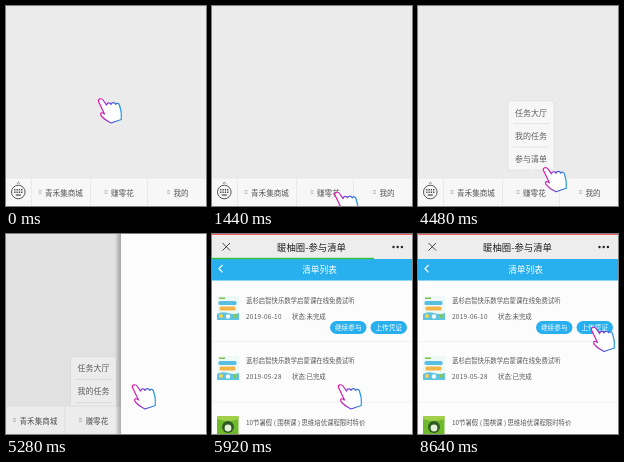
Animation, 200 px wide and 200 px high, one loop 8800 ms. Source, as an HTML page:

```html
<!DOCTYPE html>
<html>
<head>
<meta charset="utf-8">
<title>Menu tour</title>
<style>
html, body { margin: 0; width: 100%; height: 100%; overflow: hidden; background: #ebebeb; }
svg { display: block; width: 100%; height: 100%; }
text { font-family: "Noto Sans CJK SC", "Noto Sans CJK", "Noto Sans", sans-serif; dominant-baseline: central; }
.mid { text-anchor: middle; }
.bar { font-size: 7.6px; fill: #555; }
.menu { font-size: 8px; fill: #606060; }
.row { font-size: 6.4px; fill: #555; }
.day { letter-spacing: .3px; }
.btn { font-size: 6.7px; fill: #fff; }
</style>
</head>
<body>
<svg viewBox="0 0 200 200" preserveAspectRatio="none">
  <defs>
    <linearGradient id="ink" x1="0" y1="0" x2="1" y2="0">
      <stop offset="0" stop-color="#ec12a0"/>
      <stop offset=".35" stop-color="#a030c8"/>
      <stop offset=".6" stop-color="#4a4fd8"/>
      <stop offset="1" stop-color="#1f9be0"/>
    </linearGradient>
    <linearGradient id="shade">
      <stop offset="0" stop-color="#000" stop-opacity="0"/>
      <stop offset="1" stop-color="#000" stop-opacity=".3"/>
    </linearGradient>
    <g id="book">
      <rect width="22" height="24" fill="#eef8f6"/>
      <rect x="2" y="1.5" width="6" height="1.5" fill="#7cc24a"/>
      <rect x="1.5" y="5" width="18" height="4" rx="1.500" fill="#58bfe0"/>
      <rect x="2.500" y="10.500" width="16" height="4" rx="1.500" fill="#f3b548"/>
      <path d="M0 18q5-3 11-1t11 0v7H0z" fill="#5cc3e2"/>
      <circle cx="4" cy="20" r="2" fill="#f6d24f"/>
      <circle cx="11" cy="20.500" r="2.200" fill="#f4f8f4"/>
      <circle cx="18" cy="20" r="2" fill="#86c850"/>
    </g>
  </defs>

  <g id="chat">
    <rect width="260" height="200" fill="#ebebeb"/>
    <g id="popup">
      <path d="M110 163.5h6l-3 3.5z" fill="#f6f6f6"/>
      <rect x="90" y="95" width="46" height="69" rx="2" fill="#f7f7f7" stroke="#dcdcdc" stroke-width=".6"/>
      <path d="M95 117.7h36M95 141h36" stroke="#dadada" stroke-width=".7"/>
      <g id="items"></g>
    </g>
    <rect y="172" width="260" height="28" fill="#f7f7f7"/>
    <path d="M0 172h260M25.5 172v28M84.5 172v28M141.5 172v28" stroke="#e2e2e2" stroke-width=".7"/>
    <g fill="none" stroke="#444">
      <circle cx="12.3" cy="186" r="6.8" stroke-width=".9"/>
      <path d="M11 177.6l1.3-1.2 1.3 1.2" stroke-width=".8"/>
      <path d="M8.2 183.8h8.4M8.2 186.2h8.4" stroke-width="1.4" stroke-dasharray="1.3 1"/>
      <path d="M9.8 189h5" stroke-width="1.2"/>
    </g>
    <g id="tabs"></g>
    <rect id="dim" width="260" height="200" opacity="0"/>
  </g>

  <g id="page">
    <rect x="-6" width="6" height="200" fill="url(#shade)"/>
    <rect width="200" height="200" fill="#fcfcfc"/>
    <g id="title">
      <rect width="200" height="25" fill="#ededed"/>
      <rect width="200" height="1" fill="#f4605c"/>
      <path d="M10.500 9l7.500 7.500M18 9l-7.500 7.500" stroke="#333" stroke-width=".9"/>
      <g fill="#222">
        <circle cx="181.500" cy="13" r="1.200"/><circle cx="185.700" cy="13" r="1.200"/><circle cx="189.900" cy="13" r="1.200"/>
      </g>
      <text x="99.500" y="12.500" class="mid" font-size="9.400" fill="#222">暖柚圈-参与清单</text>
    </g>
    <g id="list">
      <rect y="25" width="200" height="21.500" fill="#28afee"/>
      <path d="M10.500 31l-3.500 3.700 3.500 3.700" fill="none" stroke="#fff" stroke-width="1.200"/>
      <text x="107.500" y="35" class="mid" font-size="8.700" font-weight="500" fill="#fff">清单列表</text>
      <path d="M0 107.500h200M0 168h200" stroke="#f1f1f1"/>
      <g id="rows"></g>
      <g>
        <rect x="5" y="182" width="21.500" height="18" fill="#6fb92c"/>
        <path d="M5 182h21.500v3q-11 4-21.500 0z" fill="#a3d04a"/>
        <circle cx="16" cy="193" r="6" fill="#2f5a22"/>
        <circle cx="16" cy="194" r="3.400" fill="#e6efd8"/>
      </g>
      <text x="34" y="188.500" class="row">10节暑假 ( 围棋课 ) 思维培优课程限时特价</text>
      <g id="buttons"></g>
    </g>
    <rect id="load" y="23.800" height="1.400" fill="#35c23c"/>
  </g>

  <path id="hand" fill="#fff" stroke="url(#ink)" stroke-width="1.200" stroke-linejoin="round"
    d="M1.500 4C.6 1.400 4.300 .2 6 2.500L9.600 7.600C10 5 13 4.600 14 7C14.500 4.600 17.800 4.400 18.600 6.900C19.500 5.200 22 5.600 22.600 8L24 13.500C24.800 17 24 19 24.300 22L14 25.500C11.500 24 8 22.500 5.300 19.500C2.500 17 3.500 14.500 6 15.500L7.500 16.500Z"/>
</svg>

<script>
const LOOP = 8800, STEP = 160;
const $ = id => document.getElementById(id);
const label = (x, y, cls, s) => `<text x="${x}" y="${y}" class="${cls}">${s}</text>`;

$('items').innerHTML = ['任务大厅', '我的任务', '参与清单']
  .map((s, i) => label(113, 106 + 23 * i, 'menu mid', s)).join('');

$('tabs').innerHTML = [[39, '青禾集商城'], [105, '赚零花'], [167.5, '我的']]
  .map(([x, s]) => label(x, 186, 'bar', s) +
    `<path d="M${x - 6.5} 184.5h3M${x - 6.5} 186h3M${x - 6.5} 187.5h3" stroke="#aaa" stroke-width=".6"/>`).join('');

$('rows').innerHTML = [[62, '2019-06-10', '未完成'], [122, '2019-05-28', '已完成']]
  .map(([y, day, state]) => `<use href="#book" x="5" y="${y}"/>` +
    label(34, y + 4.2, 'row', '蓝杉启智快乐数学启蒙课在线免费试听') +
    label(34, y + 20.8, 'row day', day) +
    label(80, y + 20.8, 'row', '状态:' + state)).join('');

$('buttons').innerHTML = [[118, '继续参与'], [158.5, '上传凭证']]
  .map(([x, s]) => `<rect x="${x}" y="87" width="36.5" height="13" rx="6.5" fill="#28afee"/>` +
    label(x + 18.3, 93.4, 'btn mid', s)).join('');

const part = (t, a, b) => Math.min(1, Math.max(0, (t - a) / (b - a)));
const smooth = p => p * p * (3 - 2 * p);
const show = (id, on) => $(id).setAttribute('visibility', on ? 'visible' : 'hidden');
const move = (id, x, y) => $(id).setAttribute('transform', `translate(${x.toFixed(2)} ${y.toFixed(2)})`);

// start, end, destination x, y
const moves = [[0, 1440, 121.5, 185], [3520, 4900, 125, 149.5], [5960, 7040, 172, 92]];

function handAt(t) {
  let x = 91, y = 91.5;
  for (const [a, b, tx, ty] of moves) {
    const p = part(t, a, b);
    x += (tx - x) * p;
    y += (ty - y) * p;
  }
  return [x, y];
}

function draw(t) {
  const push = smooth(part(t, 4920, 5720));
  const rise = smooth(part(t, 3000, 3760));
  const fall = smooth(part(t, 4940, 5780));

  show('chat', push < 1);
  move('chat', -60 * push, 0);
  move('popup', 0, 77 * (1 - rise + fall));
  show('popup', push < 1 && rise > 0 && fall < 1);
  $('dim').setAttribute('opacity', .1 * push);

  show('page', push > 0);
  move('page', 200 * (1 - push), 0);
  show('title', t >= 5760);
  show('list', t >= 5920);
  show('load', t >= 5760 && t < 6080);
  $('load').setAttribute('width', t < 5920 ? 120 : 162);

  move('hand', ...handAt(t));
}

function tick(now) {
  draw(Math.floor((now % LOOP) / STEP) * STEP);
  requestAnimationFrame(tick);
}
draw(0);
requestAnimationFrame(tick);
</script>
</body>
</html>
```
